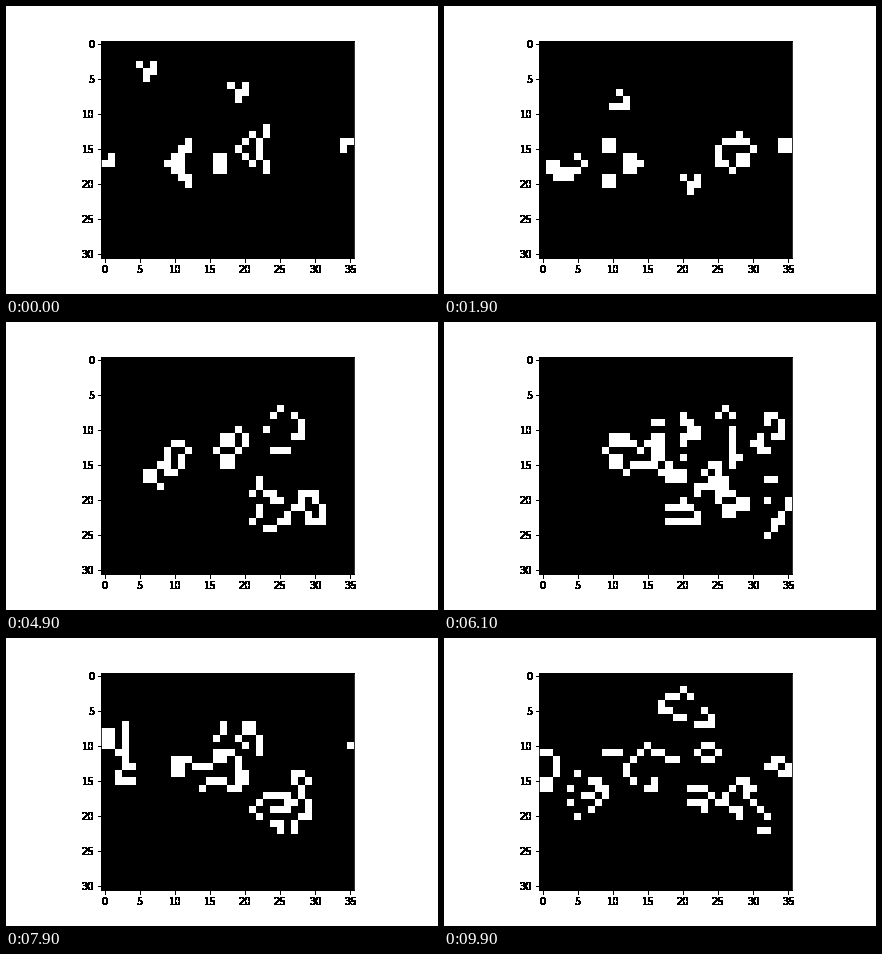
Animation of 432 by 288 pixels, one loop 10 s. Source, as a matplotlib script:

```python
import matplotlib.pyplot as plt
import numpy as np
from matplotlib.animation import FuncAnimation

ROWS, COLS = 31, 36
STEPS, INTERVAL = 100, 100

GLIDER = """
.O.
..O
OOO
"""

GUN = """
........................O...........
......................O.O...........
............OO......OO............OO
...........O...O....OO............OO
OO........O.....O...OO..............
OO........O...O.OO....O.O...........
..........O.....O.......O...........
...........O...O....................
............OO......................
"""


def place(grid, pattern, row, col):
    for r, line in enumerate(pattern.split()):
        for c, ch in enumerate(line):
            if ch == "O":
                grid[row + r, col + c] = 1


def evolve(grid):
    """One Game of Life generation on a torus."""
    near = sum(
        np.roll(grid, (dr, dc), (0, 1))
        for dr in (-1, 0, 1)
        for dc in (-1, 0, 1)
        if (dr, dc) != (0, 0)
    )
    return ((near == 3) | ((grid == 1) & (near == 2))).astype(int)


def harden(img, dpi):
    """Turn every touched pixel solid black."""
    out = np.zeros_like(img)
    out[..., 3] = img[..., 3] > 0
    return out, 0, 0


grid = np.zeros((ROWS, COLS), int)
place(grid, GUN, 12, 0)
place(grid, GLIDER, 2, 5)
place(grid, GLIDER, 5, 18)

history = []
for _ in range(STEPS):
    grid = evolve(grid)
    history.append(grid)

plt.rcParams.update({"font.family": "DejaVu Sans", "font.size": 10})
fig = plt.figure(figsize=(6, 4), dpi=72, facecolor="white")
fig.subplots_adjust(left=0.125, right=0.9, bottom=0.125, top=0.88)
ax = fig.add_subplot()
image = ax.imshow(history[0], cmap="gray", vmin=0, vmax=1, interpolation="nearest")
ax.set_xticks(range(0, COLS, 5))
ax.set_yticks(range(0, ROWS, 5))

crisp = [ax.spines["top"], ax.spines["bottom"]]
for axis in (ax.xaxis, ax.yaxis):
    for tick in axis.get_major_ticks():
        crisp += [tick.label1, tick.tick1line]
for artist in crisp:
    artist.set_agg_filter(harden)


def update(i):
    image.set_data(history[i])
    return [image]


anim = FuncAnimation(fig, update, frames=STEPS, interval=INTERVAL, repeat=True)
plt.show()
```
